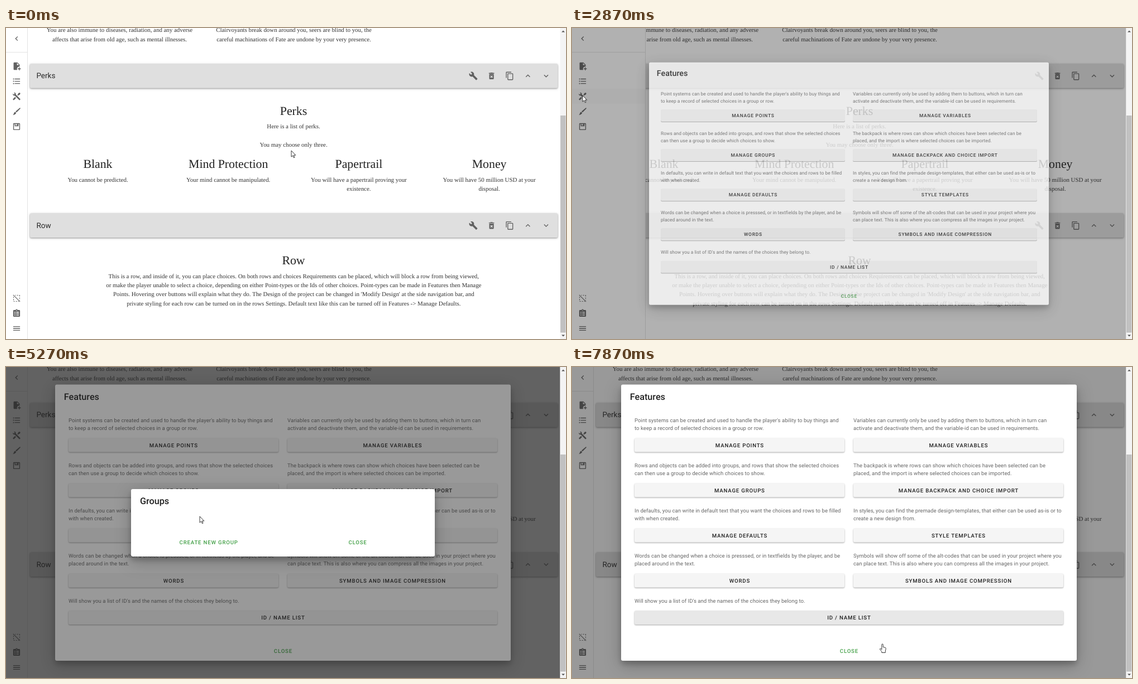
Write an HTML page that moves like this. It is 1003 by 558 pixels and loops after 8000 ms.

```html
<!DOCTYPE html>
<html lang="en">
<head>
<meta charset="utf-8">
<title>Features dialog</title>
<style>
  html, body { margin: 0; width: 100%; height: 100%; overflow: hidden; background: #fff; }
  svg { display: block; width: 1003px; height: 558px; }
  text { text-rendering: geometricPrecision; fill: rgba(0,0,0,.87); }
  .serif { font: 10.88px "Liberation Serif", "Times New Roman", serif; text-anchor: middle; fill: #333; }
  .big { font-size: 21.8px; fill: #222; }
  .bar { font: 13.5px Roboto, sans-serif; fill: rgba(0,0,0,.82); }
  .head { font: 500 16.2px Roboto, sans-serif; }
  .note { font: 9.52px Roboto, sans-serif; letter-spacing: .0071em; fill: rgba(0,0,0,.6); }
  .label { font: 500 9.58px Roboto, sans-serif; letter-spacing: .0893em; text-anchor: middle; }
  .green { fill: #43a047; }
  .icon { fill: #616161; }
  .line { fill: none; stroke: #616161; stroke-width: 1.6; }
  .raised { filter: drop-shadow(0 1px .8px rgba(0,0,0,.36)); }
  .strip { filter: drop-shadow(0 1px 1px rgba(0,0,0,.28)) drop-shadow(0 1.5px 2px rgba(0,0,0,.2)); }
  .sheet { fill: #fff; filter: drop-shadow(0 6px 5px rgba(0,0,0,.2)) drop-shadow(0 7px 14px rgba(0,0,0,.25)); }
  .cursor { fill: #fff; stroke: #222; stroke-width: .9; stroke-linejoin: round; }
</style>
</head>
<body>
<svg id="stage" viewBox="0 0 1003 558"></svg>
<script>
const FPS = 15, LOOP = 8000, LAST = 119;
const stage = document.getElementById('stage');

function add(parent, tag, attrs = {}, content) {
  const el = document.createElementNS('http://www.w3.org/2000/svg', tag);
  set(el, attrs);
  if (content) el.textContent = content;
  parent.append(el);
  return el;
}
function set(el, attrs) {
  for (const name in attrs) el.setAttribute(name, attrs[name]);
}
const group = parent => add(parent, 'g');
const text = (parent, cls, x, y, str) => add(parent, 'text', { class: cls, x, y }, str);
const rect = (parent, x, y, width, height, fill, more) =>
  add(parent, 'rect', { x, y, width, height, fill, ...more });

const dot = y => `M4,${y - 1.5}a1.5,1.5 0 1,1 0,3a1.5,1.5 0 1,1 0,-3`;
const icons = {
  up: 'M7.4,15.4L12,10.8L16.6,15.4L18,14L12,8L6,14Z',
  file: 'M14,2H6A2,2 0 0,0 4,4V20A2,2 0 0,0 6,22H13.8A6,6 0 0,1 13,19A6,6 0 0,1 20,13.1V8L14,2M13,9V3.5L18.5,9H13M18,15V18H15V20H18V23H20V20H23V18H20V15H18',
  list: 'M7,5H21V7H7ZM7,11H21V13H7ZM7,17H21V19H7Z' + [6, 12, 18].map(dot).join(''),
  tools: 'M21.7,20.3L20.3,21.7A1,1 0 0,1 18.9,21.7L7,9.85A4,4 0 0,1 2.2,4.7L4.76,7.24L7.24,4.76L4.7,2.2A4,4 0 0,1 9.85,7L21.7,18.9A1,1 0 0,1 21.7,20.3M2.3,18.9A1,1 0 0,0 2.3,20.3L3.7,21.7A1,1 0 0,0 5.1,21.7L10.6,16.25L7.76,13.42M20,2L16,4V6L13.8,8.2L15.8,10.2L18,8H20L22,4Z',
  brush: 'M20.5,2.3Q22.4,2.2 21.9,4.1L11.8,14.6L9.2,12.1ZM8.2,13L10.9,15.7Q9.6,20.2 2,21.6Q4.2,19.6 4.7,17Q5.4,13.6 8.2,13Z',
  save: 'M5,3H19A2,2 0 0,1 21,5V19A2,2 0 0,1 19,21H5A2,2 0 0,1 3,19V5A2,2 0 0,1 5,3M5,5V19H19V5H17V11H7V5ZM9,5V9H12.5V5ZM14.5,5V9H15V5Z',
  board: 'M19,3H14.8A3,3 0 0,0 9.2,3H5A2,2 0 0,0 3,5V19A2,2 0 0,0 5,21H19A2,2 0 0,0 21,19V5A2,2 0 0,0 19,3M12,3a1,1 0 1,1 -.01,0M6,8H9V10H6ZM11,8H18V10H11ZM6,12H9V14H6ZM11,12H18V14H11ZM6,16H9V18H6ZM11,16H18V18H11Z',
  menu: 'M3,6H21V8H3ZM3,11H21V13H3ZM3,16H21V18H3Z',
  wrench: 'M22.7,19L13.6,9.9C14.5,7.6 14,4.9 12.1,3C10.1,1 7.1,.6 4.7,1.7L9,6L6,9L1.6,4.7C.4,7.1 .9,10.1 2.9,12.1C4.8,14 7.5,14.5 9.8,13.6L18.9,22.7C19.3,23.1 19.9,23.1 20.3,22.7L22.6,20.4C23.1,20 23.1,19.3 22.7,19Z',
  trash: 'M6,19A2,2 0 0,0 8,21H16A2,2 0 0,0 18,19V7H6ZM8.5,11.9L9.9,10.5L12,12.6L14.1,10.5L15.5,11.9L13.4,14L15.5,16.1L14.1,17.5L12,15.4L9.9,17.5L8.5,16.1L10.6,14ZM15.5,4L14.5,3H9.5L8.5,4H5V6H19V4Z',
  copy: 'M19,21H8V7H19M19,5H8A2,2 0 0,0 6,7V21A2,2 0 0,0 8,23H19A2,2 0 0,0 21,21V7A2,2 0 0,0 19,5M16,1H4A2,2 0 0,0 2,3V17H4V3H16Z',
  deselect: 'M3,3L21,21M4,8V11M4,14V17M4,20H7M10,20H13M16,20H18M8,4H10M13,4H16M19,4H20V7M20,10V13M20,16V17'
};
function icon(parent, name, x, y, turn = 0, cls = 'icon') {
  add(parent, 'path', {
    class: cls, d: icons[name], 'fill-rule': 'evenodd',
    transform: `translate(${x} ${y}) rotate(${turn}) scale(.68) translate(-12 -12)`
  });
}

// Page
const page = group(stage);
rect(page, 0, 0, 1003, 558, '#fff');
function serif(x, y, lines, cls = 'serif') {
  lines.forEach((s, i) => text(page, cls, x, y + i * 16.3, s));
}
const title = (x, y, s) => serif(x, y, [s], 'serif big');

serif(203.5, 7.2, ['You are also immune to diseases, radiation, and any adverse', 'affects that arise from old age, such as mental illnesses.']);
serif(515.5, 7.2, ['Clairvoyants break down around you, seers are blind to you, the', 'careful machinations of Fate are undone by your very presence.']);

function bar(y, name) {
  rect(page, 43, y, 945, 43.5, '#dfdfdf', { class: 'strip', rx: 2 });
  text(page, 'bar', 54.4, y + 26, name);
  ['wrench', 'trash', 'copy', 'up', 'up'].forEach((n, i) =>
    icon(page, n, 837 + i * 32.6, y + 21.8, i === 4 ? 180 : 0));
}
bar(64.2, 'Perks');
bar(332.6, 'Row');

title(515, 155.6, 'Perks');
serif(515, 180, ['Here is a list of perks.', '', 'You may choose only three.']);
[
  ['Blank', 'You cannot be predicted.'],
  ['Mind Protection', 'Your mind cannot be manipulated.'],
  ['Papertrail', 'You will have a papertrail proving your', 'existence.'],
  ['Money', 'You will have 50 million USD at your', 'disposal.']
].forEach(([name, ...lines], i) => {
  const x = 164.5 + i * 233.7;
  title(x, 250.7, name);
  serif(x, 275.7, lines);
});
title(515, 423.7, 'Row');
serif(515.3, 448.7, [
  'This is a row, and inside of it, you can place choices. On both rows and choices Requirements can be placed, which will block a row from being viewed,',
  'or make the player unable to select a choice, depending on either Point-types or the Ids of other choices. Point-types can be made in Features then Manage',
  "Points. Hovering over buttons will explain what they do. The Design of the project can be changed in 'Modify Design' at the side navigation bar, and",
  'private styling for each row can be turned on in the rows Settings. Default text like this can be turned off in Features -> Manage Defaults.'
]);

// Side navigation
const nav = group(stage);
const navBack = rect(nav, 0, 0, 38, 558, '#fff');
const navRule = rect(nav, 0, 43, 38, 1, '#e2e2e2');
const navEdge = rect(nav, 38, 0, 1, 558, '#e2e2e2');
const navHover = rect(nav, 0, 109, 38, 27, '#000');
icon(nav, 'up', 19, 19, -90);
['file', 'list', 'tools', 'brush', 'save'].forEach((n, i) => icon(nav, n, 19, 68.5 + i * 27.1));
icon(nav, 'deselect', 19, 485, 0, 'line');
icon(nav, 'board', 19, 512);
icon(nav, 'menu', 19, 539);

// Features dialog
const scrim = () => rect(stage, 0, 0, 992.5, 558, '#212121');
const scrimA = scrim();
const features = group(stage);
rect(features, 88, 31.5, 816, 495.5, '#fff', { class: 'sheet', rx: 3 });
text(features, 'head', 103.8, 59, 'Features');

function button(x, y, width, label) {
  rect(features, x, y - 12.3, width, 24.8, '#f5f5f5', { class: 'raised', rx: 2.5 });
  const tint = rect(features, x, y - 12.3, width, 24.8, '#000', { rx: 2.5, opacity: 0 });
  const ripple = rect(features, x, y - 12.3, 0, 24.8, '#000', { opacity: 0 });
  text(features, 'label', x + width / 2 + .4, y + 3.5, label);
  return { tint, ripple };
}
const buttons = [
  ['MANAGE POINTS', "Point systems can be created and used to handle the player's ability to buy things and", 'to keep a record of selected choices in a group or row.'],
  ['MANAGE VARIABLES', 'Variables can currently only be used by adding them to buttons, which in turn can', 'activate and deactivate them, and the variable-id can be used in requirements.'],
  ['MANAGE GROUPS', 'Rows and objects can be added into groups, and rows that show the selected choices', 'can then use a group to decide which choices to show.'],
  ['MANAGE BACKPACK AND CHOICE IMPORT', 'The backpack is where rows can show which choices have been selected can be', 'placed, and the import is where selected choices can be imported.'],
  ['MANAGE DEFAULTS', 'In defaults, you can write in default text that you want the choices and rows to be filled', 'with when created.'],
  ['STYLE TEMPLATES', 'In styles, you can find the premade design-templates, that either can be used as-is or to', 'create a new design from.'],
  ['WORDS', 'Words can be changed when a choice is presssed, or in textfields by the player, and be', 'placed around in the text.'],
  ['SYMBOLS AND IMAGE COMPRESSION', 'Symbols will show off some of the alt-codes that can be used in your project where you', 'can place text. This is also where you can compress all the images in your project.']
].map(([label, ...lines], i) => {
  const x = i % 2 ? 504 : 112, y = 81 * (i >> 1);
  lines.forEach((s, n) => text(features, 'note', x, y + 98.5 + n * 14.7, s));
  return button(x, y + 140, 376, label);
});
text(features, 'note', 112, 422.5, "Will show you a list of ID's and the names of the choices they belong to.");
const idList = button(112, 449.5, 768, 'ID / NAME LIST');
const manage = buttons[2];
text(features, 'label green', 496.4, 512.8, 'CLOSE');

// Groups dialog
const scrimB = scrim();
const groups = group(stage);
const groupSheet = rect(groups, 224, 219, 544, 121, '#fff', { class: 'sheet', rx: 3 });
const groupHead = text(groups, 'head', 240, 246, 'Groups');
const groupFoot = group(groups);
text(groupFoot, 'label green', 363.2, 317.6, 'CREATE NEW GROUP');
text(groupFoot, 'label green', 630, 317.6, 'CLOSE');

// Scrollbar
rect(stage, 992.5, 0, 11, 558, '#f4f4f4');
rect(stage, 993, 157, 9.5, 389.5, '#c1c1c1');
add(stage, 'path', { d: 'M995,7.5h6l-3,-3zM995,550.5h6l-3,3z', fill: '#555' });

const arrow = add(stage, 'path', { class: 'cursor', d: 'M0,0V11.2L2.6,8.9L4.4,12.8L6,12.1L4.3,8.2H7.8Z' });
const hand = add(stage, 'path', { class: 'cursor', d: 'M-1.2,9V1.2A1.2,1.2 0 0 1 1.2,1.2V5.5L5,6.4Q6.4,6.9 6.2,8.5L5.2,13V15.5H-1.2V13.5L-4.6,9.6Q-4.8,8 -3.2,8.3L-1.2,10Z' });

// Tracks: [step, ...values] at 15 steps per second
const track = {
  cursor: [[15, 511, 220], [17, 496, 218], [22, 330, 190], [28, 174, 157], [29, 137, 148], [33, 26, 123], [37, 19, 121],
    [48, 19, 121], [52, 106, 129], [55, 235, 192], [59, 325, 226], [60, 325, 226], [62, 296, 226], [74, 296, 226],
    [78, 321, 255], [79, 347, 268], [83, 380, 300], [87, 391, 310], [93, 391, 310], [103, 622, 374], [106, 622, 374],
    [111, 567, 451], [114, 563, 465], [118, 556, 497]],
  nav: [[31, 38], [32, 62], [33, 108], [34, 126], [35, 131], [46, 131], [47, 85], [48, 50], [50, 38]],
  featuresOpen: [[41, 0], [42, .2], [43, .755], [44, .755], [45, .98], [46, 1]],
  groupsOpen: [[68, 0], [69, .445], [70, .85], [71, .96], [73, 1], [104, 1], [105, .5], [106, .2], [107, .05], [108, 0]],
  dimmed: [[68, 0], [69, .445], [70, .85], [71, .96], [73, 1], [111, 1], [112, .6], [113, .25], [114, .08], [116, 0]],
  press: [[53, 0], [55, .05], [66, .05], [67, .12], [69, .25], [71, .25], [75, 0]],
  ripple: [[66, 0], [67, 110], [69, 351], [70, 376]],
  rippleFade: [[66, 0], [67, .13], [71, .13], [75, 0]]
};
function at(keys, step) {
  const i = keys.findIndex(k => k[0] >= step);
  if (i === 0) return keys[0].slice(1);
  if (i < 0) return keys[keys.length - 1].slice(1);
  const a = keys[i - 1], b = keys[i], p = (step - a[0]) / (b[0] - a[0]);
  return a.slice(1).map((v, n) => v + (b[n + 1] - v) * p);
}
const within = (step, ...spans) => spans.some(([a, b]) => step >= a && step <= b);

function dialog(el, open) {
  const s = .5 + open / 2;
  set(el, { opacity: open, transform: `translate(496 279.2) scale(${s}) translate(-496 -279.2)` });
}

function draw(step) {
  const value = name => at(track[name], step)[0];

  const width = value('nav');
  set(navBack, { width });
  set(navRule, { width });
  set(navEdge, { x: width });
  set(navHover, { width, opacity: within(step, [33, 47]) ? .02 : 0 });

  const open = value('featuresOpen');
  set(scrimA, { opacity: open * .46 });
  dialog(features, open);

  const ripple = value('ripple');
  set(manage.tint, { opacity: value('press') });
  set(manage.ripple, { x: 300 - ripple / 2, width: ripple, opacity: value('rippleFade') });
  set(idList.tint, { opacity: step >= 110 ? .055 : 0 });

  set(scrimB, { opacity: value('dimmed') * .46 });
  dialog(groups, value('groupsOpen'));
  const grow = step >= 92 ? 61.5 : 0;
  set(groupSheet, { y: 219 - grow, height: 121 + grow * 2 });
  set(groupHead, { y: 246 - grow });
  set(groupFoot, { transform: `translate(0 ${grow})` });

  const [x, y] = at(track.cursor, step);
  const pointing = within(step, [33, 41], [55, 67], [84, 91], [101, 104], [110, LAST]);
  set(arrow, { transform: `translate(${x} ${y})`, opacity: pointing ? 0 : 1 });
  set(hand, { transform: `translate(${x} ${y})`, opacity: pointing ? 1 : 0 });
}

const start = performance.now();
let shown = -1;
function tick() {
  const time = (performance.now() - start) % LOOP;
  const step = Math.min(LAST, Math.floor((time + 4) * FPS / 1000));
  if (step !== shown) draw(shown = step);
  requestAnimationFrame(tick);
}
tick();
</script>
</body>
</html>
```
